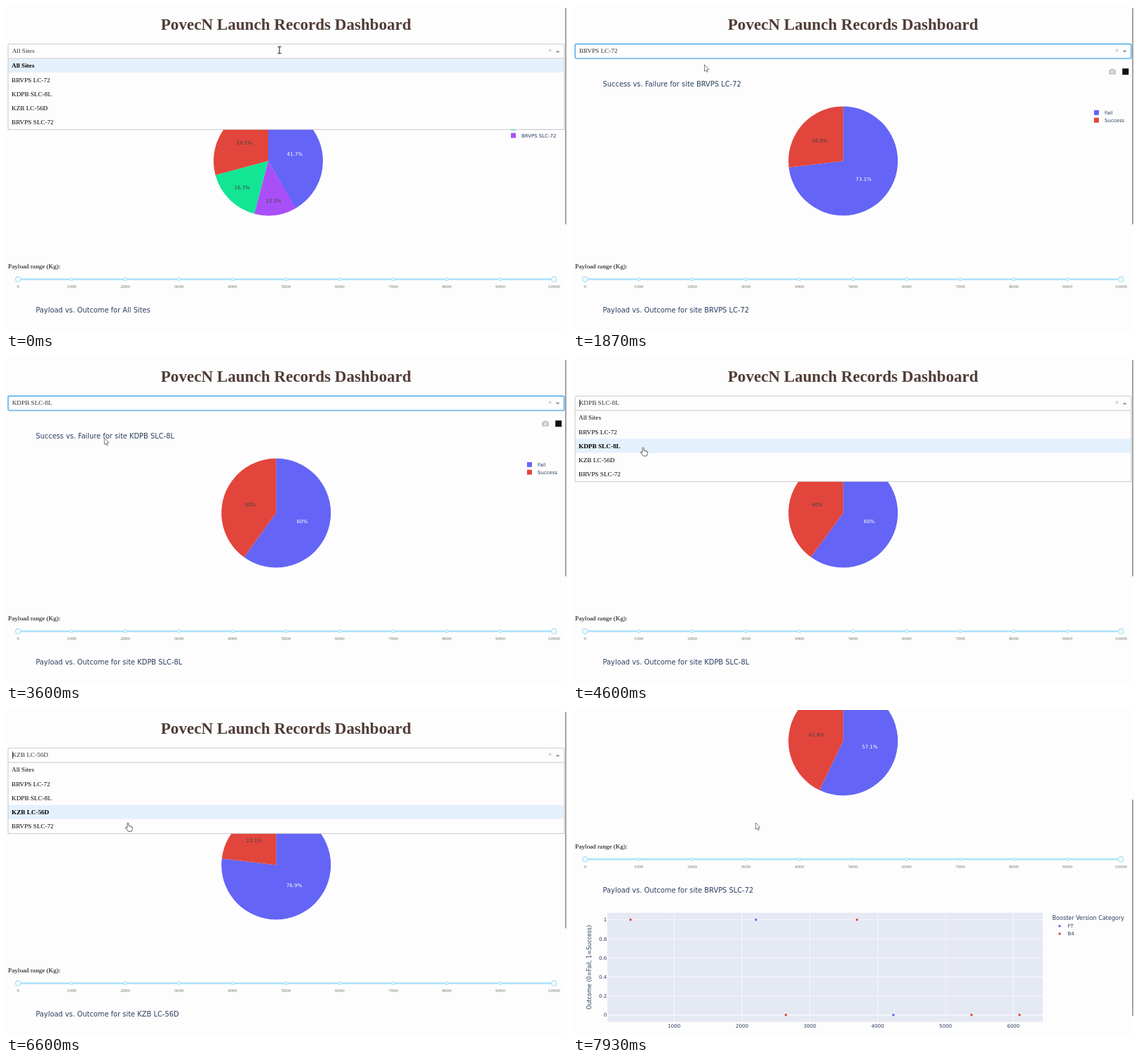
An HTML page with a canvas that plays this animation: 800 px wide and 463 px high, repeating every 8 s.

```html
<!DOCTYPE html>
<html lang="en">
<head>
<meta charset="utf-8">
<title>Launch Records Dashboard</title>
<style>
  html, body { margin: 0; width: 100%; height: 100%; overflow: hidden; background: #fefdfe; }
  canvas { display: block; width: 800px; height: 463px; }
</style>
</head>
<body>
<canvas id="stage"></canvas>
<script>
const W = 800, H = 463, LOOP = 8000;
const canvas = document.getElementById('stage');
const ratio = window.devicePixelRatio || 1;
canvas.width = Math.round(W * ratio);
canvas.height = Math.round(H * ratio);
const ctx = canvas.getContext('2d');

const SERIF = '"Liberation Serif", serif';
const SANS = '"DejaVu Sans", sans-serif';
const PAPER = '#fefdfe', INK = '#2a3f5f';
const BLUE = '#6464f6', RED = '#e2453c', GREEN = '#12e594', PURPLE = '#a94ff7';

const SITES = ['All Sites', 'BRVPS LC-72', 'KDPB SLC-8L', 'KZB LC-56D', 'BRVPS SLC-72'];
const YES_NO = ['Success', 'Fail'], NO_YES = ['Fail', 'Success'];
// Shares and legend entries, largest first.
const PIES = [
  { shares: [41.7, 29.2, 16.7, 12.5], names: [3, 1, 2, 4].map(i => SITES[i]) },
  { shares: [73.1, 26.9], names: NO_YES },
  { shares: [60, 40], names: NO_YES },
  { shares: [76.9, 23.1], names: YES_NO },
  { shares: [57.1, 42.9], names: NO_YES }
];
const COLORS = [BLUE, RED, GREEN, PURPLE];

// time, selected site, menu open, pie site, scatter site
const STATES = [
  [0, 0, true, 0, 0],
  [1130, 1, false, 0, 0],
  [1330, 1, false, 1, 1],
  [2600, 1, true, 1, 1],
  [3200, 2, false, 1, 1],
  [3400, 2, false, 2, 2],
  [4300, 2, true, 2, 2],
  [5130, 3, false, 2, 2],
  [5330, 3, false, 3, 3],
  [6270, 3, true, 3, 3],
  [6800, 4, false, 3, 3],
  [6930, 4, false, 4, 3],
  [7000, 4, false, 4, 4]
];

// time, x, y of the pointer tip
const POINTER = [
  [0, 390, 63], [200, 390, 63], [930, 167, 105], [1500, 168, 105],
  [2200, 203, 66], [2600, 203, 66], [2730, 203, 85], [3080, 150, 125], [3450, 148, 125],
  [4000, 104, 66], [4300, 102, 66], [4500, 100, 128], [4650, 100, 128],
  [4950, 98, 146], [5350, 98, 146], [5750, 148, 67], [6130, 151, 65], [6270, 151, 65],
  [6650, 175, 166], [6850, 175, 166], [7300, 260, 156], [7670, 260, 156], [7930, 260, 161], [8000, 260, 161]
];
const SCROLL = [[0, 0], [7620, 0], [7670, 7], [7735, 50], [7800, 98], [7870, 143], [7930, 177], [8000, 197]];

const smooth = u => u * u * (3 - 2 * u);

function sample(keys, t, ease = u => u) {
  let i = 1;
  while (i < keys.length - 1 && keys[i][0] <= t) i++;
  const a = keys[i - 1], b = keys[i];
  const u = ease(Math.min(1, Math.max(0, (t - a[0]) / (b[0] - a[0]))));
  return a.slice(1).map((v, k) => v + (b[k + 1] - v) * u);
}

function text(str, x, y, font, color, align = 'left') {
  ctx.font = font;
  ctx.fillStyle = color;
  ctx.textAlign = align;
  ctx.fillText(str, x, y);
}

function box(x, y, w, h, color) {
  ctx.fillStyle = color;
  ctx.fillRect(x, y, w, h);
}

function line(x1, y1, x2, y2, color, width) {
  ctx.strokeStyle = color;
  ctx.lineWidth = width;
  ctx.beginPath();
  ctx.moveTo(x1, y1);
  ctx.lineTo(x2, y2);
  ctx.stroke();
}

function disc(x, y, r, fill, stroke, width) {
  ctx.beginPath();
  ctx.arc(x, y, r, 0, Math.PI * 2);
  ctx.fillStyle = fill;
  ctx.fill();
  if (!stroke) return;
  ctx.strokeStyle = stroke;
  ctx.lineWidth = width;
  ctx.stroke();
}

function polygon(points, fill, stroke, width) {
  ctx.beginPath();
  points.forEach(([x, y]) => ctx.lineTo(x, y));
  ctx.closePath();
  ctx.fillStyle = fill;
  ctx.fill();
  if (!stroke) return;
  ctx.strokeStyle = stroke;
  ctx.lineWidth = width;
  ctx.stroke();
}

function drawPie(site) {
  const { shares, names } = PIES[site];
  const cx = site ? 385.2 : 374, cy = 221.5, R = 78;
  const title = site ? 'Success vs. Failure for site ' + SITES[site] : 'Total Success Launches By Site';
  text(title, 42.5, 114.9, `9.9px ${SANS}`, INK);

  // The largest sector runs clockwise from the top, the others counterclockwise.
  let end = 100;
  shares.forEach((share, i) => {
    const from = i ? end - share : 0, to = from + share;
    if (i) end = from;
    const angle = p => p / 100 * Math.PI * 2 - Math.PI / 2;
    ctx.beginPath();
    ctx.moveTo(cx, cy);
    ctx.arc(cx, cy, R, angle(from), angle(to));
    ctx.closePath();
    ctx.fillStyle = COLORS[i];
    ctx.fill();
    const r = 39 + 18 * Math.pow(Math.max(0, (40 - share) / 27.5), 1.6);
    const mid = angle((from + to) / 2);
    text(share + '%', cx + r * Math.cos(mid), cy + r * Math.sin(mid) + 2.6,
      `7.1px ${SANS}`, i ? '#444444' : '#ffffff', 'center');
  });

  const lx = site ? 743 : 720;
  names.forEach((name, i) => {
    const y = 152.3 + i * 10.9;
    box(lx, y - 3.5, 7, 7, COLORS[i]);
    text(name, lx + 15, y + 2.5, `7px ${SANS}`, INK);
  });
}

function drawTools() {
  ctx.fillStyle = '#bfbfc2';
  ctx.beginPath();
  ctx.roundRect(764.5, 91, 9.4, 6.8, 1);
  ctx.rect(767, 89.8, 4.4, 1.6);
  ctx.fill();
  disc(769.2, 94.3, 2.2, PAPER);
  disc(769.2, 94.3, 1.2, '#bfbfc2');
  box(783.4, 89.3, 9, 9, '#111111');
}

function drawSlider(color) {
  text('Payload range (Kg):', 3, 375, `9.23px ${SERIF}`, '#000000');
  line(17, 390.5, 781.5, 390.5, color, 2.4);
  for (let i = 0; i <= 10; i++) {
    const x = 17.2 + i * 76.42, edge = i % 10 === 0;
    disc(x, 390.5, edge ? 3.6 : 1.9, PAPER, color, edge ? 1.5 : 1.2);
    text(String(i * 1000), x, 403.3, `6.92px ${SERIF}`, '#777777', 'center');
  }
}

function drawScatter(site) {
  const name = site ? 'site ' + SITES[site] : SITES[0];
  text('Payload vs. Outcome for ' + name, 42.5, 438, `9.9px ${SANS}`, INK);
  if (site !== 4) return;

  const left = 49, right = 670, top = 467, bottom = 623;
  const px = kg => 47.4 + kg * 0.09677, py = v => 613 - v * 136;
  box(left, top, right - left, bottom - top, '#e5e9f4');
  for (let kg = 1000; kg <= 6000; kg += 1000) {
    line(px(kg), top, px(kg), bottom, '#f8f9fc', 0.9);
    text(String(kg), px(kg), 630.8, `7.1px ${SANS}`, INK, 'center');
  }
  for (let i = 0; i <= 5; i++) {
    const v = i / 5;
    line(left, py(v), right, py(v), '#f9fafd', i ? 0.9 : 1.5);
    text(String(v), 48.3, py(v) + 2.6, `7.1px ${SANS}`, INK, 'right');
  }
  const dots = [[82, 1, RED], [260.8, 1, BLUE], [405, 1, RED], [303.5, 0, RED],
    [456.8, 0, BLUE], [568.3, 0, RED], [636.8, 0, RED]];
  dots.forEach(([x, v, color]) => disc(x, py(v), 1.75, color));

  ctx.save();
  ctx.translate(26.3, 545);
  ctx.rotate(-Math.PI / 2);
  text('Outcome (0=Fail, 1=Success)', 0, 0, `8.1px ${SANS}`, INK, 'center');
  ctx.restore();

  text('Booster Version Category', 683.6, 477, `8.05px ${SANS}`, INK);
  [['FT', BLUE], ['B4', RED]].forEach(([label, color], i) => {
    const y = 486 + i * 11;
    disc(694, y, 1.75, color);
    text(label, 705.5, y + 2.6, `7px ${SANS}`, INK);
  });
}

function drawSelect(value, open, hover, caret, accent) {
  ctx.beginPath();
  ctx.roundRect(3, 54.4, 793, 20.6, 2);
  ctx.fillStyle = PAPER;
  ctx.fill();
  if (!open) {
    ctx.globalAlpha = 0.25;
    ctx.strokeStyle = accent;
    ctx.lineWidth = 2.4;
    ctx.stroke();
    ctx.globalAlpha = 1;
  }
  ctx.strokeStyle = open ? '#c4c4c6' : accent;
  ctx.lineWidth = open ? 0.9 : 1.2;
  ctx.stroke();

  text(SITES[value], 8.7, 67.3, `9.23px ${SERIF}`, '#333333');
  if (caret) line(9.5, 59.3, 9.5, 70, '#222222', 0.8);
  text('×', 775.6, 67.4, `9.6px ${SERIF}`, '#999999', 'center');
  const base = open ? 66.2 : 63.4, tip = open ? 63.4 : 66.4;
  polygon([[783.6, base], [789.8, base], [786.7, tip]], '#8f8f8f');

  if (!open) return;
  box(3, 75, 793, 101.5, PAPER);
  box(3.4, 75 + hover * 20.2, 792.2, 20.2, '#e4f1fc');
  ctx.strokeStyle = '#c4c4c6';
  ctx.lineWidth = 0.9;
  ctx.strokeRect(3, 75, 793, 101.6);
  line(3.6, 75, 795.4, 75, '#e6e6e8', 1);
  SITES.forEach((name, i) => {
    const weight = i === value ? 'bold ' : '';
    text(name, 8, 88.4 + i * 20.2, `${weight}9.23px ${SERIF}`, '#000000');
  });
}

function drawPointer(kind, x, y) {
  ctx.save();
  ctx.translate(x, y);
  ctx.lineJoin = 'round';
  if (kind === 'beam') {
    line(0, -4.5, 0, 4.5, '#222222', 1.1);
    line(-2.6, -4.8, 2.6, -4.8, '#222222', 1);
    line(-2.6, 4.8, 2.6, 4.8, '#222222', 1);
  } else if (kind === 'hand') {
    polygon([[-1, 0.6], [0, -0.2], [1, 0.6], [1.2, 4.4], [3, 4.4], [4.6, 5], [6.2, 5.8],
      [6.4, 8.6], [5.2, 12], [0, 12], [-1.6, 9.6], [-3.8, 6.8], [-2.8, 6], [-1, 7.4]],
      '#ffffff', '#555555', 0.9);
    line(2.8, 4.8, 2.8, 6.6, '#777777', 0.6);
    line(4.6, 5.2, 4.6, 6.8, '#777777', 0.6);
  } else {
    polygon([[0.4, 0], [0.4, 9.6], [2.6, 7.6], [4, 10.8], [5.4, 10.2], [4, 7.2], [6.8, 6.9]],
      '#ffffff', '#666666', 0.85);
  }
  ctx.restore();
}

function draw(t) {
  const [since, value, open, pie, scatter] = STATES.filter(s => s[0] <= t).pop();
  const [x, y] = sample(POINTER, t, smooth);
  const [scroll] = sample(SCROLL, t);

  // The highlighted row trails the pointer slightly.
  const pastY = sample(POINTER, Math.max(0, t - 80), smooth)[1];
  const hover = pastY > 75 ? Math.min(4, Math.floor((pastY - 75) / 20.2)) : value;
  const openedAt = since || -550;
  const caret = open && (t - openedAt) % 1000 < 500;
  const late = t >= 7000;

  ctx.setTransform(ratio, 0, 0, ratio, 0, 0);
  box(0, 0, W, H, PAPER);
  ctx.save();
  ctx.translate(0, -scroll);
  text('PovecN Launch Records Dashboard', 399.3, 33.6, `bold 23.08px ${SERIF}`, '#503d36', 'center');
  drawPie(pie);
  if (!open && y + scroll > 80) drawTools();
  drawSlider(late ? '#a6e5f4' : '#abe2fa');
  drawScatter(scatter);
  drawSelect(value, open, hover, caret, late ? '#48b4cc' : '#48a8e6');
  ctx.restore();

  box(797.4, 3 + scroll * 0.706, 1.6, 309, '#8d8d8f');
  drawPointer(y < 75 ? 'beam' : open && t > 960 ? 'hand' : 'arrow', x, y);
}

const start = performance.now();
function tick() {
  draw((performance.now() - start) % LOOP);
  requestAnimationFrame(tick);
}
tick();
</script>
</body>
</html>
```
